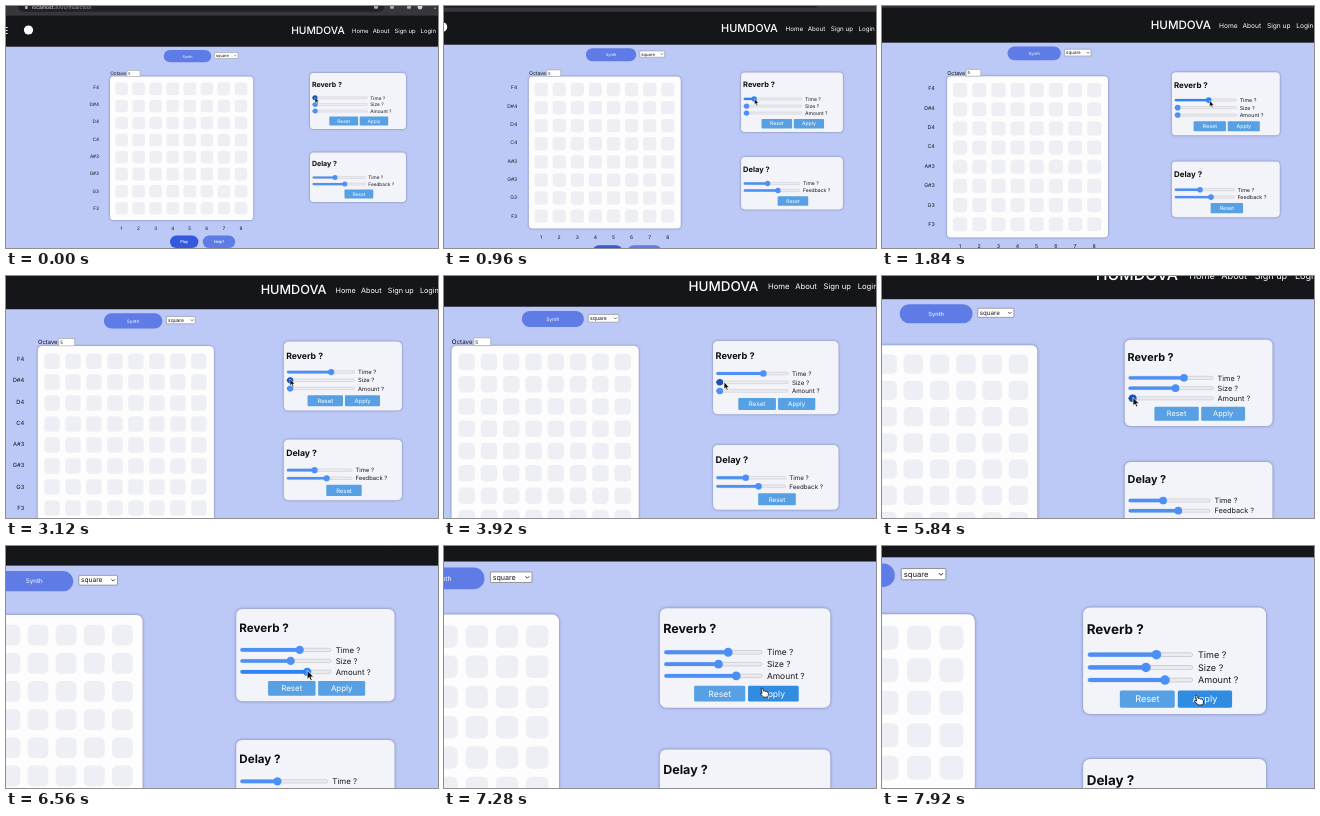
Recreate the animation shown at these times as an HTML page. Size 432 by 242 pixels, loop 8000 ms.

```html
<!DOCTYPE html>
<html lang="en">
<head>
<meta charset="utf-8">
<style>
  html, body { margin: 0; width: 100%; height: 100%; overflow: hidden; background: #bcc8f5; }
  svg { display: block; width: 100vw; height: 100vh; }
  text { font-family: Inter, "Liberation Sans", sans-serif; text-rendering: geometricPrecision; white-space: pre; }
  .card { filter: drop-shadow(0 .3px .9px rgba(40, 45, 80, .5)); }
</style>
</head>
<body>
<svg id="stage" viewBox="0 0 432 242" preserveAspectRatio="none"></svg>
<script>
const LOOP = 8000, STEP = 80;
const IDLE = '#4c8ff7', HOVER = '#1552b8', ACTIVE = '#2d82f4';
const stage = document.getElementById('stage');

function add(tag, attrs, parent = stage) {
  const el = document.createElementNS('http://www.w3.org/2000/svg', tag);
  for (const k in attrs) el.setAttribute(k, attrs[k]);
  return parent.appendChild(el);
}
const rect = (x, y, w, h, fill, rx = 0, more = {}) =>
  add('rect', { x, y, width: w, height: h, fill, rx, ...more });
const path = (d, stroke, width, more = {}) =>
  add('path', { d, fill: 'none', stroke, 'stroke-width': width, ...more });
function text(str, x, y, size, fill = '#15161a', weight = 400, anchor = 'start') {
  add('text', { x, y, 'font-size': size, fill, 'font-weight': weight, 'text-anchor': anchor })
    .textContent = str;
}
function button(label, x, y, w, h, fill, rx, size, weight = 400) {
  const box = rect(x, y, w, h, fill, rx);
  text(label, x + w / 2, y + h / 2 + size * 0.36, size, '#fff', weight, 'middle');
  return box;
}

// A range input; returns a setter for thumb position and colour
function slider(label, y, end, labelX) {
  const x = 306.5;
  rect(x, y - 1, end - x, 2, '#ececef', 1, { stroke: '#b4b5ba', 'stroke-width': 0.3 });
  const bar = rect(x, y - 1.1, 0, 2.2, IDLE, 1.1);
  const thumb = add('circle', { cx: x, cy: y, r: 2.5 });
  text(label, labelX, y + 1.75, 4.75);
  return (pos, color) => {
    bar.setAttribute('width', pos - x);
    thumb.setAttribute('cx', pos);
    bar.setAttribute('fill', color);
    thumb.setAttribute('fill', color);
  };
}

function drawPage() {
  rect(0, 0, 432, 242, '#bcc8f5');

  // browser bar and site header
  rect(0, 0, 432, 40.7, '#15161a');
  rect(0, 0, 432, 9.6, '#36373b');
  rect(12, -8, 366, 13.8, '#202124', 5);
  rect(19, 0, 2.6, 3, '#aeb0b4', 0.5);
  text('localhost', 26, 3.4, 5, '#e8eaed');
  text(':3000/musictool', 46.6, 3.4, 5, '#a4a7ac');
  for (const x of [368, 384, 401]) rect(x, 0, 4, 2.8, '#a9abb0', 0.8);
  add('circle', { cx: 414, cy: 1, r: 2.4, fill: '#d5d6d9' });
  add('circle', { cx: 429, cy: 2.2, r: 0.7, fill: '#d5d6d9' });
  for (const y of [21, 24, 27]) rect(0, y, 1.6, 1, '#fff');
  add('circle', { cx: 22.5, cy: 24, r: 4.6, fill: '#fff' });
  text('HUMDOVA', 285.2, 28.4, 10.3, '#fff', 500);
  [['Home', 346], ['About', 366.8], ['Sign up', 388.5], ['Login', 414.6]]
    .forEach(([s, x]) => text(s, x, 27.4, 5.9, '#fff'));

  // sound choice
  button('Synth', 157.8, 44, 47.4, 12.3, '#5f7ce6', 6.1, 3.75);
  rect(208.6, 46.6, 23.4, 5.9, '#fff', 0.4, { stroke: '#777', 'stroke-width': 0.4 });
  text('square', 209.9, 50.9, 4);
  path('M228.3 49l1.1 1.1 1.1-1.1', '#222', 0.5);

  // note grid
  rect(104, 70.6, 143.2, 143.4, '#fdfdfe', 3.6, { class: 'card' });
  text('Octave', 104.2, 69.2, 4.75);
  rect(121, 64.5, 13, 6, '#fff', 0.2, { stroke: '#888', 'stroke-width': 0.4 });
  text('5', 122.2, 68.9, 3.7);
  ['F4', 'D#4', 'D4', 'C4', 'A#3', 'G#3', 'G3', 'F3'].forEach((note, i) => {
    text(note, 93, 82.9 + 17.27 * i, 4.7, '#15161a', 400, 'end');
    text(i + 1, 115.5 + 17.05 * i, 223.6, 4.7, '#15161a', 400, 'middle');
    for (let j = 0; j < 8; j++)
      rect(109.3 + 17.05 * j, 76.6 + 17.05 * i, 12.6, 12.6, '#eeeff4', 3.2);
  });
  button('Play', 164, 229.6, 28.4, 12.4, '#3359df', 6.2, 3.9, 500);
  button('Help?', 196.8, 229.6, 32.4, 12.4, '#5f7ce6', 6.2, 3.9, 500);

  // effect panels
  rect(304, 67, 96, 56, '#f3f4f9', 3.6, { class: 'card' });
  rect(304, 146.5, 96, 49.4, '#f3f4f9', 3.6, { class: 'card' });
  text('Reverb ?', 305.9, 81, 7.05, '#0c0d10', 700);
  text('Delay ?', 305.9, 160.4, 7.05, '#0c0d10', 700);
  button('Reset', 323.3, 110.6, 28.8, 9, '#57a0e4', 0.8, 4.8);
  button('Reset', 338.5, 183.4, 28.8, 9.1, '#57a0e4', 0.8, 4.8);
}

drawPage();
const apply = button('Apply', 353.7, 110.6, 28.5, 9, '#57a0e4', 0.8, 4.8);
slider('Time ?', 171.5, 359.6, 362.3)(329, IDLE);
slider('Feedback ?', 178.1, 359.6, 362.3)(338.8, IDLE);

// drag: [start, end] times, from 309 to the given position
const knobs = [
  { label: 'Time ?', y: 91.8, keys: [[640, 309], [1840, 336.7], [2160, 342.5]] },
  { label: 'Size ?', y: 98.5, keys: [[4000, 309.2], [4800, 337]] },
  { label: 'Amount ?', y: 105.1, keys: [[5840, 309.2], [6480, 347], [6640, 347]] },
];
for (const k of knobs) k.set = slider(k.label, k.y, 361.5, 364.3);

const cursorKeys = [
  [0, 309, 91.5], [640, 309, 91.5], [1840, 337.5, 92.2], [2160, 342.6, 92.3],
  [2400, 342.6, 92.6], [2960, 309, 97.4], [3680, 309, 97.6], [3920, 312.4, 98.3],
  [4000, 312.4, 98.3], [4800, 337.5, 99], [5160, 337.5, 99], [5680, 309.4, 104.5],
  [5840, 309.4, 104.5], [6480, 347, 104.1], [6720, 347, 104.3], [7360, 363.2, 113.2],
];
const ink = { fill: '#111', stroke: '#fff', 'stroke-width': 0.45, 'stroke-linejoin': 'round' };
const arrow = add('path', { d: 'M0 0V5.4L1.3 4.3 2.1 6.2 3.1 5.8 2.3 4H4Z', ...ink });
const hand = add('path', {
  d: 'M-.2 0Q.6-.5 .9.4L1.2 1.6Q2 1.2 2.3 1.8 3 1.5 3.2 2.1 4 2 4 2.8 4.1 4.2 3.4 5H1.1Q.4 3.9-.7 3.1-.5 2.3.4 2.9Z',
  ...ink, fill: '#fff', stroke: '#111',
});

// Values at time t from rows of [time, ...values]
function at(keys, t) {
  if (t <= keys[0][0]) return keys[0].slice(1);
  const i = keys.findIndex(k => k[0] > t);
  if (i < 0) return keys[keys.length - 1].slice(1);
  const a = keys[i - 1], b = keys[i], p = (t - a[0]) / (b[0] - a[0]);
  return a.slice(1).map((v, n) => v + (b[n + 1] - v) * p);
}

function draw(t) {
  // the view shrinks and drifts at a constant rate
  const k = 1 - 6e-5 * t;
  stage.setAttribute('viewBox', `${0.02506 * t} ${0.00439 * t} ${432 * k} ${242 * k}`);

  const [x, y] = at(cursorKeys, t);
  for (const { keys, y: ky, set } of knobs) {
    const dragging = t > keys[0][0] && t <= keys[keys.length - 1][0];
    const over = Math.abs(y - ky) < 2 && x < 361.5;
    set(at(keys, t)[0], dragging ? ACTIVE : over ? HOVER : IDLE);
  }
  const onApply = y > 110.6;
  apply.setAttribute('fill', onApply ? '#2f8ce0' : '#57a0e4');
  arrow.setAttribute('visibility', onApply ? 'hidden' : 'visible');
  hand.setAttribute('visibility', onApply ? 'visible' : 'hidden');
  for (const c of [arrow, hand]) c.setAttribute('transform', `translate(${x} ${y})`);
}

const start = performance.now();
function tick() {
  const t = (performance.now() - start) % LOOP;
  draw(Math.floor(t / STEP) * STEP);
  requestAnimationFrame(tick);
}
tick();
</script>
</body>
</html>
```
